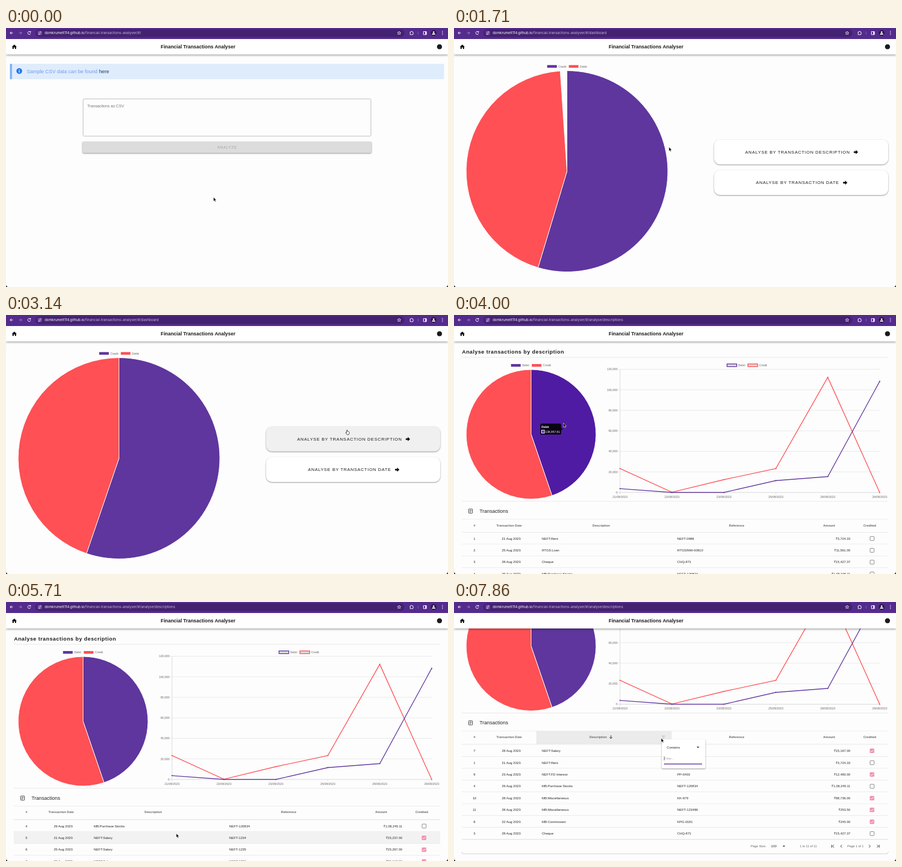
An HTML page that plays this animation: 800x470 px, repeating every 8000 ms.

```html
<!DOCTYPE html>
<html lang="en">
<head>
<meta charset="utf-8">
<title>Financial Transactions Analyser</title>
<style>
html, body { margin: 0; width: 100%; height: 100%; overflow: hidden; background: #fdfdfd; }
svg { display: block; }
text { font-family: "Liberation Sans", Arial, sans-serif; white-space: pre; }
.shadow { filter: drop-shadow(0 1px 1.2px rgba(0,0,0,.42)); }
.icon { fill: none; stroke: #fff; stroke-width: 1; }
</style>
</head>
<body>
<svg id="stage" viewBox="0 0 800 470" width="100%" height="100%"></svg>
<script>
const PURPLE = '#5f369d', RED = '#ff5055', GREY = '#666';
const ROW = 21.45, BODY_TOP = 394.8, BODY_HEIGHT = 172.6;
const stage = document.getElementById('stage');

// Markup helpers
const text = (x, y, size, str, fill = '#222', extra = '') =>
  `<text x="${x}" y="${y}" font-size="${size}" fill="${fill}" ${extra}>${str}</text>`;
const rect = (x, y, w, h, fill, extra = '') =>
  `<rect x="${x}" y="${y}" width="${w}" height="${h}" fill="${fill}" ${extra}/>`;
const path = (d, extra = '') => `<path d="${d}" ${extra}/>`;
const hline = (y, x1 = 14, x2 = 786, color = '#e2e2e2') =>
  path(`M${x1} ${y}H${x2}`, `stroke="${color}" stroke-width=".8"`);
const MID = 'text-anchor="middle"', END = 'text-anchor="end"', BOLD = 'font-weight="700"';

// Time helpers
const clamp = v => Math.max(0, Math.min(1, v));
const smooth = v => { v = clamp(v); return v * v * (3 - 2 * v); };
const ramp = (t, a, b) => smooth((t - a) / (b - a));
const outQuart = v => 1 - (1 - clamp(v)) ** 4;

const transactions = [
  ['21 Aug 2023', 'NEFT:Rent', 'NEFT-0986', '3,724.33', 0],
  ['25 Aug 2023', 'RTGS:Loan', 'RTGSINW-00610', '11,561.00', 0],
  ['28 Aug 2023', 'Cheque', 'CHQ-871', '15,427.37', 0],
  ['29 Aug 2023', 'MB:Purchase Stocks', 'NEFT-120834', '1,08,245.11', 0],
  ['21 Aug 2023', 'NEFT:Salary', 'NEFT-1234', '23,237.00', 1],
  ['25 Aug 2023', 'NEFT:Salary', 'NEFT-1235', '23,267.00', 1],
  ['28 Aug 2023', 'NEFT:Salary', 'NEFT-1236', '23,167.00', 1],
  ['22 Aug 2023', 'MB:Commission', 'KPG-0181', '245.00', 1],
  ['23 Aug 2023', 'NEFT:FD Interest', 'PP-0403', '12,480.00', 1],
  ['28 Aug 2023', 'MB:Miscellaneous', 'KK-979', '88,736.00', 1],
  ['28 Aug 2023', 'MB:Miscellaneous', 'NEFT-123486', '253.50', 1]
].map(([date, description, reference, amount, credited], i) =>
  ({ id: i + 1, date, description, reference, amount, credited,
     value: +amount.replaceAll(',', '') }));

const days = ['21', '22', '23', '25', '28', '29'];
const dailyTotals = credited => days.map(day => transactions
  .filter(r => r.credited === credited && r.date.startsWith(day))
  .reduce((sum, r) => sum + r.value, 0));
const debits = dailyTotals(0), credits = dailyTotals(1);
const total = list => list.reduce((a, b) => a + b, 0);
const creditShare = total(credits) / (total(credits) + total(debits));

const legend = (x, y, color, label) =>
  rect(x, y, 17.5, 4.8, color) + text(x + 20.3, y + 4.4, 5.36, label, GREY);
const lineLegend = (x, color, label) =>
  rect(x, 88.8, 17.5, 4.8, '#dedede', `stroke="${color}" stroke-width="1.4"`) +
  text(x + 20.3, 93.4, 5.36, label, GREY);

function browserBar() {
  return rect(0, 0, 800, 20, '#542b8d') + rect(53, 2.3, 668, 14, '#43226f', 'rx="7"') +
    `<circle cx="61" cy="9" r="5.3" fill="#542b8d"/>
    <g class="icon">
      <path d="M12.5 9H7.5M10 6.5 7.5 9 10 11.5"/>
      <path d="M23.5 9h5M26 6.5 28.5 9 26 11.5" opacity=".4"/>
      <path d="M44 7.2A2.7 2.7 0 1 0 44.6 9.6M44.6 5.8V7.7H42.6"/>
      <path d="M58.5 7.5H61M58.5 10.8H59.8M61.8 10.8H64" stroke-width=".8"/>
      <circle cx="62.7" cy="7.5" r="1" stroke-width=".8"/><circle cx="60.2" cy="10.8" r="1" stroke-width=".8"/>
      <path d="M711.5 6 712.4 8 714.5 8.2 712.9 9.6 713.4 11.8 711.5 10.6 709.6 11.8 710.1 9.6 708.5 8.2 710.6 8Z" stroke-width=".8"/>
      <path d="M731.5 7H733.2A1 1 0 0 1 735.2 7H736.5V8.6A1 1 0 0 1 736.5 10.6V12H731.5Z"/>
      <path d="M746 6.5V12" opacity=".25"/>
      <path d="M755.5 6.5H761V12H755.5Z"/><path d="M759.7 6.5V12" stroke-width="2"/>
    </g>
    <circle cx="774" cy="9" r="5" fill="#29153f"/><circle cx="774" cy="7.6" r="1.5" fill="#fff"/>
    <path d="M771 12A3 2.4 0 0 1 777 12Z" fill="#fff"/>` +
    [6.3, 9, 11.7].map(y => `<circle cx="790" cy="${y}" r=".8" fill="#fff"/>`).join('') +
    `<text x="70" y="11.3" font-size="6.28" fill="#fff" style="font-family:Inter,sans-serif">domkrumelt114.github.io<tspan fill="#c9b8df">/financial-transactions-analyser/#/<tspan id="route"></tspan></tspan></text>`;
}

function appHeader() {
  return rect(0, 20, 800, 28, '#fff', 'style="filter:drop-shadow(0 1px 2px rgba(0,0,0,.45))"') +
    path('M10.5 34.3 15 30 19.5 34.3H18.3V38H16V35.3H14V38H11.7V34.3Z', 'fill="#111"') +
    text(280, 37.2, 8.87, 'Financial Transactions Analyser', '#1a1a1a', BOLD) +
    '<circle cx="784.6" cy="34" r="4.6" fill="#1b1b1b"/>';
}

function homePage() {
  const csv = transactions.slice(-4).map((r, i) =>
    text(147, 143.5 + i * 12, 7.1, `${r.date},${r.description},${r.reference},${r.value.toFixed(2)},true`)).join('');
  return rect(7, 65, 786, 28, '#dfecfb', 'rx="2"') + rect(7, 65, 4, 28, '#85b5f8', 'rx="1"') +
    '<circle cx="24" cy="78" r="5.2" fill="#2477f2"/>' +
    path('M24 75V76.2M24 77.2V81', 'stroke="#fff" stroke-width="1.3"') +
    text(37.4, 81.8, 9.17, 'Sample CSV data can be found <tspan fill="#20395f">here</tspan>', '#6d9cf3') +
    rect(139.5, 128.7, 521, 67.5, '#fdfdfd', 'id="field" rx="2"') +
    `<g id="label">${rect(144.5, 126, 56, 5, '#fdfdfd', 'id="notch"')}${text(147, 143.6, 7.14, 'Transactions as CSV', '#777', 'id="labelText"')}</g>` +
    `<g id="csv">${csv}</g>` +
    rect(138.5, 206, 523, 20.7, '#dcdcdc', 'id="analyze" class="shadow" rx="2"') +
    text(400.4, 218.9, 6.7, 'ANALYZE', '#a6a6a6', `id="analyzeText" ${MID} letter-spacing=".85"`);
}

function dashboardPage() {
  const button = (id, y, textX, arrowX, label) =>
    rect(470.7, y, 315.3, 45, '#fff', `id="${id}" class="shadow" rx="11"`) +
    text(textX, y + 25.4, 7.9, label, '#1c1c1c', 'letter-spacing=".78"') +
    path(`M${arrowX} ${y + 21.2}h3.6v-2.4l4.2 3.9-4.2 3.9v-2.4h-3.6Z`, 'fill="#111"');
  return legend(168.6, 67.3, PURPLE, 'Credit') + legend(207.8, 67.3, RED, 'Debit') +
    '<g id="bigPie"></g>' +
    button('byDescription', 202.5, 527, 723.6, 'ANALYSE BY TRANSACTION DESCRIPTION') +
    button('byDate', 258, 546.4, 704.2, 'ANALYSE BY TRANSACTION DATE');
}

function chartAxes() {
  let out = path('M300.5 98.5V322', 'stroke="#d2d2d2" stroke-width=".8"');
  for (let i = 0; i <= 6; i++) {
    const y = 322 - i * 37.25;
    out += hline(y, 297, 770.5, i ? '#e4e4e4' : '#cfcfcf') +
      text(296, y + 1.9, 5.35, (i * 20000).toLocaleString('en-US'), GREY, END);
  }
  days.forEach((day, i) => {
    const x = 300.5 + 94 * i;
    out += path(`M${x} 322v3.5`, 'stroke="#d2d2d2" stroke-width=".7"') +
      text(x, 331.8, 5.4, day + '/08/2023', GREY, MID);
  });
  return out;
}

function tableRow(r) {
  const box = r.credited
    ? rect(752.6, 6.8, 8, 8, '#f28fb0', 'rx="1.2"') + path('M754.3 10.8 756 12.6 759 9', 'fill="none" stroke="#fff" stroke-width="1"')
    : rect(753.1, 7.2, 7.2, 7.2, '#fff', 'rx="1" stroke="#777" stroke-width=".9"');
  return `<g id="row${r.id}">` + rect(14, 0, 772, ROW, '#fdfdfd') + hline(ROW - .4) +
    text(37, 12.8, 6, r.id, '#222', MID) + text(103.5, 12.8, 6.1, r.date, '#222', MID) +
    text(159, 12.8, 6, r.description) + text(404, 12.8, 6, r.reference) +
    text(717.3, 12.8, 5.9, '₹' + r.amount, '#222', END) + box + '</g>';
}

function transactionsTable() {
  const head = (x, label, extra = '') => text(x, 383.5, 5.7, label, GREY, `${MID} ${BOLD} ${extra}`);
  const pager = 'fill="none" stroke="#333" stroke-width="1"';
  return hline(338) + rect(26.5, 352, 7, 7.6, 'none', 'rx=".8" stroke="#333" stroke-width=".9"') +
    path('M28 354.2H32M28 355.9H32M28 357.6H30.5', 'stroke="#333" stroke-width=".7"') +
    text(46.3, 358.8, 9.08, 'Transactions') + hline(370.5, 14, 786, '#ebebeb') +
    rect(149, 370.5, 245, 24.2, '#ebebeb', 'id="headHover"') +
    head(37, '#') + head(99.7, 'Transaction Date') + head(266.5, 'Description', 'id="descriptionHead"') +
    head(511.6, 'Reference') + head(679, 'Amount') + head(752.5, 'Credited') +
    path('M0 -3V2.6M-2.4 .3 0 2.8 2.4 .3', 'id="sortArrow" fill="none" stroke="#222" stroke-width="1"') +
    path('M375.8 379.5h6.4M376.8 381.5h4.4M377.8 383.5h2.4', 'id="filterIcon" stroke="#bbb" stroke-width=".9"') +
    hline(394.5) +
    `<svg x="14" y="${BODY_TOP}" width="772" height="${BODY_HEIGHT}" viewBox="14 0 772 ${BODY_HEIGHT}">${transactions.map(tableRow).join('')}</svg>` +
    hline(567.6) + text(537, 581.9, 5.8, 'Page Size:', GREY) + text(574, 581.9, 5.9, '100') +
    path('M594.8 578.7h4.6l-2.3 2.4Z', 'fill="#222"') + text(626, 581.9, 5.7, '1 to 11 of 11', GREY) +
    path('M683.6 577.2v5M687.6 577.2 685.1 579.7 687.6 582.2M702.2 577.2 699.7 579.7 702.2 582.2', pager) +
    text(712, 581.9, 5.75, 'Page 1 of 1', GREY) +
    path('M751 577.2 753.5 579.7 751 582.2M765.5 577.2 768 579.7 765.5 582.2M769.6 577.2v5', pager) +
    path('M14 590Q14 593.5 18 593.5H782Q786 593.5 786 590', 'fill="none" stroke="#cfcfcf" stroke-width="1"');
}

function analysisPage() {
  const tooltip = rect(156, 197, 38, 20, '#000', 'rx="2.6" opacity=".86"') +
    path('M194 204.5 197 207 194 209.5Z', 'opacity=".86"') +
    text(158.2, 204.6, 5.5, 'Debit', '#fff', BOLD) +
    rect(158.4, 209, 5.4, 5.4, PURPLE, 'stroke="#fff" stroke-width="1"') +
    text(165.2, 213.9, 5.3, '138,957.81', '#fff');
  return text(14.4, 69.6, 9.6, 'Analyse transactions by description', '#1a1a1a', `${BOLD} letter-spacing=".58"`) +
    hline(76.8) + legend(103.2, 89, PURPLE, 'Debit') + legend(140.8, 89, RED, 'Credit') +
    '<g id="smallPie"></g>' + lineLegend(494.2, PURPLE, 'Debit') + lineLegend(532, RED, 'Credit') +
    chartAxes() + `<g id="lines"></g><g id="tooltip">${tooltip}</g>` + transactionsTable();
}

const filterPopup = rect(376, 249, 79, 53, '#fff', 'class="shadow" rx="1.5"') +
  text(385, 265.6, 6.1, 'Contains') + path('M439.3 262.5h4.6l-2.3 2.4Z', 'fill="#222"') +
  text(380.6, 285.6, 6.1, 'Filter...', '#aaa') + path('M380.4 280V287.5', 'stroke="#222" stroke-width=".6"') +
  path('M380 294H449', `stroke="${PURPLE}" stroke-width="1.3"`);

const cursors =
  path('M0 0V7.4L1.7 5.9 2.8 8.4 4.1 7.8 3 5.4H5.3Z', 'id="arrow" fill="#000" stroke="#fff" stroke-width=".6"') +
  path('M-.8 -2.5V2.2L-1.8 1.2Q-3 1 -2.6 2.2L-.6 5.5H3L3.8 2.6V.8Q3.2 -.2 2.7 .4 2.2 -.6 1.5 0 1 -.8 .4 -.3V-2.5Q-.2 -3.6 -.8 -2.5Z',
    'id="hand" fill="#fff" stroke="#222" stroke-width=".8"');

stage.innerHTML = rect(0, 0, 800, 470, '#fdfdfd') +
  `<g id="home">${homePage()}</g><g id="dashboard">${dashboardPage()}</g><g id="analysis">${analysisPage()}</g>` +
  `<g id="popup">${filterPopup}</g>` + rect(796, 20, 2.8, 344, '#7b7b7b', 'id="scrollbar" rx="1.4"') +
  appHeader() + browserBar() +
  path('M0 465Q0 470 5 470H0ZM800 465Q800 470 795 470H800Z', 'fill="#111"') + cursors;

const el = {};
stage.querySelectorAll('[id]').forEach(node => el[node.id] = node);
const show = (id, on) => el[id].style.display = on ? '' : 'none';
const set = (id, attrs) => Object.entries(attrs).forEach(([k, v]) => el[id].setAttribute(k, v));

function pie(cx, cy, r, share, grow, firstColor) {
  const at = turn => `${cx + r * Math.sin(turn * 2 * Math.PI)} ${cy - r * Math.cos(turn * 2 * Math.PI)}`;
  const slice = (from, to, fill) => path(
    `M${cx} ${cy}L${at(from)}A${r} ${r} 0 ${to - from > .5 ? 1 : 0} 1 ${at(to)}Z`,
    `fill="${fill}" stroke="#fff" stroke-width="1" stroke-linejoin="round"`);
  return slice(0, share * grow, firstColor) + slice(share * grow, grow, RED);
}

function chartLine(values, color, grow) {
  const points = values.map((v, i) => [300.5 + 94 * i, 322 - v * grow * 223.5 / 120000]);
  return `<polyline points="${points.join(' ')}" fill="none" stroke="${color}" stroke-width="1.35"/>` +
    points.map(([x, y]) => `<circle cx="${x}" cy="${y}" r="1.1" fill="${color}"/>`).join('');
}

// Pointer stops: time, x, y
const route = [
  [0, 375.5, 307], [140, 375.5, 305], [430, 372, 163], [715, 372, 163], [1000, 389, 216],
  [2100, 389, 216], [2860, 617.5, 211.5], [3430, 617.5, 211.5], [4000, 198, 196],
  [4290, 200, 199], [4714, 483.5, 257.5], [5143, 310, 420], [5850, 308, 420], [6000, 292, 400],
  [6286, 286, 309], [6430, 268, 243], [7000, 268, 243], [7429, 375, 247], [8000, 375, 247]
];
function pointer(t) {
  const i = Math.max(1, route.findIndex(stop => stop[0] >= t));
  const [t0, x0, y0] = route[i - 1], [t1, x1, y1] = route[i];
  const p = ramp(t, t0, t1);
  return [x0 + (x1 - x0) * p, y0 + (y1 - y0) * p];
}

function drawHome(t) {
  const focused = t > 420, filled = t > 700;
  set('field', { stroke: focused ? PURPLE : '#b4b4b4', 'stroke-width': focused ? 1.2 : .9 });
  show('notch', focused);
  set('labelText', focused ? { y: 130.6, 'font-size': 5.4, fill: PURPLE } : { y: 143.6, 'font-size': 7.14, fill: '#777' });
  show('csv', filled);
  set('analyze', { fill: filled ? PURPLE : '#dcdcdc' });
  set('analyzeText', { fill: filled ? '#fff' : '#a6a6a6' });
}

function drawAnalysis(t) {
  const grow = outQuart((t - 3500) / 500);
  const hovered = t > 3850 && t < 4600;
  el.smallPie.innerHTML = pie(139.5, 216.5, 117.5, 1 - creditShare, grow, hovered ? '#501ba3' : PURPLE);
  el.lines.innerHTML = chartLine(credits, RED, grow) + chartLine(debits, PURPLE, grow);
  const leave = ramp(t, 4571, 4714);
  set('tooltip', { opacity: t > 3850 ? clamp((4850 - t) / 200) : 0, transform: `translate(${-15.5 * leave} ${4.5 * leave})` });

  const scroll = 138.5 * ramp(t, 5714, 6143) - 2 * ramp(t, 6860, 7000);
  const inner = (ROW * transactions.length - BODY_HEIGHT) * ramp(t, 5286, 5714);
  set('analysis', { transform: `translate(0 ${-scroll})` });
  set('scrollbar', { y: 20 + scroll * 106 / 138.5 });
  show('scrollbar', t > 5850 && t < 7100);

  const order = t < 6560 ? 0 : t < 6990 ? 1 : -1;
  const sorted = [...transactions].sort((a, b) => order * a.description.localeCompare(b.description));
  const [hx, hy] = pointer(t - 143);
  const bodyY = hy + scroll - BODY_TOP;
  const over = bodyY > 0 && bodyY < BODY_HEIGHT && hx > 14 ? Math.floor((bodyY + inner) / ROW) : -1;
  sorted.forEach((r, i) => {
    set('row' + r.id, { transform: `translate(0 ${i * ROW - inner})` });
    el['row' + r.id].firstChild.setAttribute('fill', i === over ? '#f2f2f2' : '#fdfdfd');
  });
  const headHover = t > 6420;
  show('headHover', headHover);
  show('filterIcon', headHover);
  show('sortArrow', order);
  set('sortArrow', { transform: `translate(284 381.5) scale(1 ${-order || 1})` });
  set('descriptionHead', { x: order ? 261 : 266.5 });
}

function draw(t) {
  const page = t < 1420 ? 'home' : t < 3560 ? 'dashboard' : 'analysis';
  for (const id of ['home', 'dashboard', 'analysis']) show(id, id === page);
  el.route.textContent = { home: '', dashboard: 'dashboard', analysis: 'analyse/descriptions' }[page];
  show('popup', t > 7560);
  show('scrollbar', false);
  const [x, y] = pointer(t);
  const onButton = page === 'dashboard' && x > 471 && y > 202 && y < 247;
  if (page === 'home') drawHome(t);
  if (page === 'dashboard') {
    el.bigPie.innerHTML = pie(204.5, 260, 182.5, creditShare, Math.min(.99999, outQuart((t - 1375) / 500)), PURPLE);
    set('byDescription', { fill: onButton ? '#f0f0f0' : '#fff' });
  }
  if (page === 'analysis') drawAnalysis(t);
  const hand = onButton || (page === 'home' && t > 990);
  show('hand', hand);
  show('arrow', !hand);
  set(hand ? 'hand' : 'arrow', { transform: `translate(${x} ${y})` });
}

const start = performance.now();
let shown = -1;
function tick() {
  const t = (performance.now() - start) % 8000;
  let step = Math.min(55, Math.floor(t * 7 / 1000) + 1);
  while (Math.round(step * 100 / 7) * 10 > t) step--;
  if (step !== shown) draw((shown = step) * 1000 / 7);
  requestAnimationFrame(tick);
}
tick();
</script>
</body>
</html>
```
